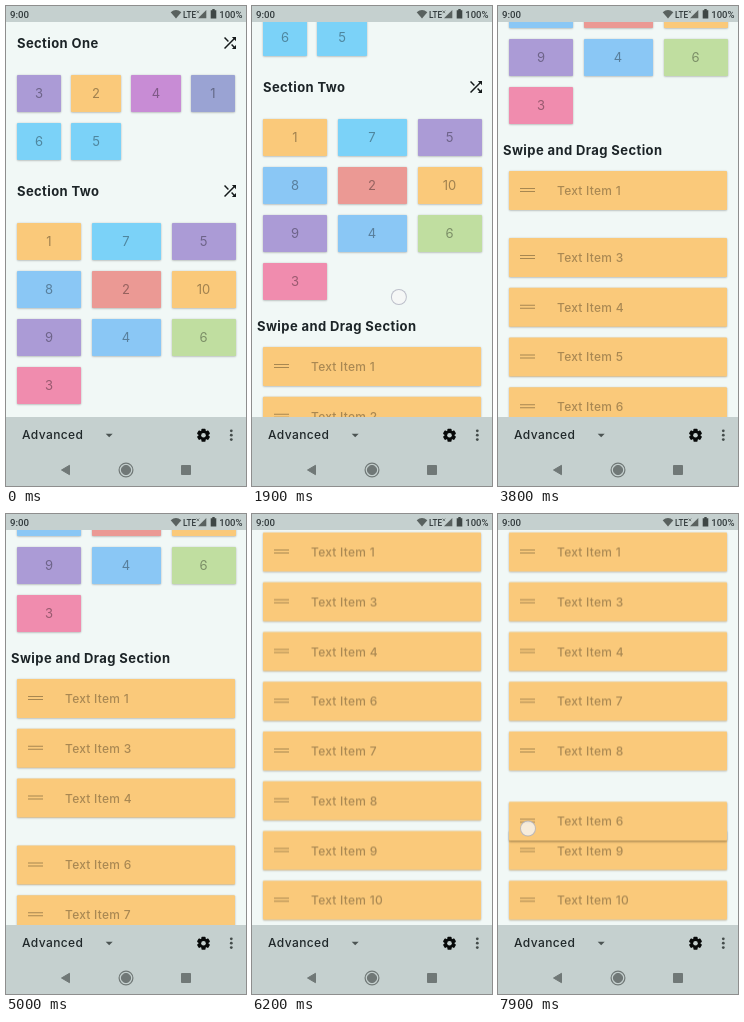
Animation, 240 px wide and 480 px high, one loop 8 s. Source, as an HTML page:

```html
<!DOCTYPE html>
<html lang="en">
<head>
<meta charset="utf-8">
<title>Lists</title>
<style>
  html, body { margin: 0; width: 100%; height: 100%; overflow: hidden; }
  #stage { position: relative; width: 240px; height: 480px; overflow: hidden;
    background: #f1f8f6; font: 500 12px Inter, sans-serif; }
  #page, #page > *, #touch { position: absolute; }
  #page { left: 0; top: 0; width: 240px; height: 900px; will-change: transform; }
  h2 { margin: 0; height: 20px; font: 700 13px/20px Inter, sans-serif;
    letter-spacing: .4px; color: #1c2427; white-space: nowrap; }
  .card { border-radius: 1px; box-shadow: 0 .5px 2px rgba(0, 0, 0, .32); }
  .tile { height: 37px; font: 400 13px/37px Inter, sans-serif;
    text-align: center; color: rgba(0, 0, 0, .36); }
  .row { left: 11px; top: 0; width: 218px; height: 39px; line-height: 39px;
    background: #fac97a; color: rgba(0, 0, 0, .32); letter-spacing: .25px; }
  .row span { position: absolute; left: 48px; white-space: nowrap; }
  .row::before { content: ""; position: absolute; left: 11px; top: 16.6px; width: 15px;
    height: 2px; border: solid rgba(0, 0, 0, .33); border-width: 1.8px 0; }
  #touch { left: -8px; top: -8px; width: 14px; height: 14px; border-radius: 50%;
    border: 1px solid rgba(110, 115, 140, .42); background: rgba(246, 246, 246, .78); }
  #chrome { position: absolute; left: 0; top: 0; }
</style>
</head>
<body>
<div id="stage">
  <div id="page"></div>
  <svg id="chrome" width="240" height="480" viewBox="0 0 240 480">
    <defs>
      <path id="shuffle" d="M10.59 9.17L5.41 4 4 5.41l5.17 5.17zM14.5 4l2.04 2.04L4 18.59 5.41 20 17.96 7.46 20 9.5V4zM14.83 13.41l-1.41 1.41 3.13 3.13L14.5 20H20v-5.5l-2.04 2.04z"/>
      <rect id="tooth" x="-2.1" y="-6.5" width="4.2" height="13" rx=".8"/>
    </defs>
    <path fill="#c5d0cf" d="M0 0H240V16H0zM0 411H240V480H0z"/>
    <g font-family="Roboto, sans-serif" font-size="9.7" fill="#30383a">
      <text x="4" y="12">9:00</text>
      <text x="177" y="11.5" font-size="8.2">LTE</text>
      <text x="236.5" y="12" font-size="9.5" text-anchor="end">100%</text>
    </g>
    <g fill="#59615f">
      <path d="M164.7 6.2Q170 1.6 175.3 6.2L170 12.5z"/>
      <path d="M200.3 4V12.3H192z"/>
      <path d="M190.6 4.6l2.6 2.6m0-2.6l-2.6 2.6" stroke="#59615f" stroke-width=".8"/>
      <path d="M204.7 4.2h1.6V3h2.4v1.2h1.6v8.3h-5.6z" fill="#3f4746"/>
    </g>
    <text x="16" y="433.4" font-family="Inter, sans-serif" font-size="12" font-weight="500" letter-spacing=".4" fill="#20282a">Advanced</text>
    <path d="M99.7 427.7h7l-3.5 3.6z" fill="#4c5453"/>
    <g transform="translate(197.5 429.2)" fill="#080a0a">
      <use href="#tooth"/>
      <use href="#tooth" transform="rotate(60)"/>
      <use href="#tooth" transform="rotate(120)"/>
      <circle r="4.9"/>
      <circle r="2.3" fill="#c5d0cf"/>
    </g>
    <g fill="#444c4b">
      <circle cx="225.3" cy="424.8" r="1.4"/>
      <circle cx="225.3" cy="429.2" r="1.4"/>
      <circle cx="225.3" cy="433.6" r="1.4"/>
    </g>
    <g fill="#707877" stroke="#707877" stroke-linejoin="round">
      <path d="M55.5 464l8-4.7v9.4z"/>
      <circle cx="120" cy="464" r="4.6"/>
      <circle cx="120" cy="464" r="6.9" fill="none" stroke-width="1.2"/>
      <path d="M175.5 459.5h9v9h-9z"/>
    </g>
  </svg>
  <div id="touch"></div>
</div>
<script>
const LOOP = 8000, STEP = 100, PITCH = 49.75, LIST_TOP = 445;
const page = document.getElementById('page');
const touch = document.getElementById('touch');

function add(tag, cls, html, style) {
  const el = document.createElement(tag);
  el.className = cls;
  el.innerHTML = html;
  Object.assign(el.style, style);
  page.append(el);
  return el;
}

function heading(text, x, mid, icon) {
  add('h2', '', text, { left: x + 'px', top: mid - 10 + 'px' });
  if (icon) add('div', '', `<svg width="18" height="18" viewBox="0 0 24 24" style="display:block" fill="#14191a"><use href="#shuffle"/></svg>`,
    { left: '215px', top: mid - 9 + 'px' });
}

const colors = {
  purple: '#ab9bd6', orange: '#fac97a', magenta: '#c88cd5', indigo: '#9aa3d3', cyan: '#7bd2f8',
  blue: '#8ac7f5', red: '#eb9994', green: '#c0dea0', pink: '#f08cae'
};

// Each column is [left, width]; tiles fill the columns row by row.
function grid(top, columns, tiles) {
  tiles.split(' ').forEach((tile, i) => {
    const [label, color] = tile.split(':');
    const [left, width] = columns[i % columns.length];
    add('div', 'card tile', label, {
      left: left + 'px', width: width + 'px', background: colors[color],
      top: top + 48 * Math.floor(i / columns.length) + 'px'
    });
  });
}

heading('Section One', 11, 37, true);
grid(68.5, [[11, 44], [65, 50], [125, 50], [185, 44]],
  '3:purple 2:orange 4:magenta 1:indigo 6:cyan 5:cyan');
heading('Section Two', 11, 185, true);
grid(217, [[11, 64], [85.5, 69], [165.5, 64]],
  '1:orange 7:cyan 5:purple 8:blue 2:red 10:orange 9:purple 4:blue 6:green 3:pink');
heading('Swipe and Drag Section', 5, 424, false);

const rows = Array.from({ length: 10 }, (_, i) =>
  add('div', 'card row', `<span>Text Item ${i + 1}</span>`, {}));
rows[5].style.zIndex = 1;

// Piecewise linear value at time t
function track(points, t) {
  if (t <= points[0][0]) return points[0][1];
  for (let i = 1; i < points.length; i++) {
    const [a, va] = points[i - 1], [b, vb] = points[i];
    if (t < b) return va + (vb - va) * (t - a) / (b - a);
  }
  return points[points.length - 1][1];
}

// Accelerate-decelerate move lasting 250 ms
const settle = (t, start) => {
  const p = Math.min(1, Math.max(0, (t - start) / 250));
  return (1 - Math.cos(Math.PI * p)) / 2;
};

const scrollPath = [[1200, 0], [1400, 5], [1600, 32], [1900, 104], [2200, 208], [2400, 267], [2500, 280],
  [5200, 280], [5300, 296], [5500, 360], [5700, 412], [5900, 424], [6000, 426.5]];
const swipeA = [[3000, 0], [3100, 12], [3300, 95], [3500, 245]];
const swipeB = [[4400, 0], [4500, 70], [4700, 245]];
const dragPath = [[6600, 0], [6800, 4], [7000, 13], [7200, 28], [7300, 39], [7400, 53],
  [7600, 97], [7700, 107], [7900, 120]];

// Finger gestures: from, to, place
const gestures = [
  [1200, 2700, s => [148 - 3 * s.scroll / 280, 395 - s.scroll]],
  [3000, 3500, s => [110 + s.a * .6, 235]],
  [4400, 4700, s => [110 + s.b * .6, 335]],
  [5200, 6200, s => [148, 605 - s.scroll]],
  [6500, LOOP, s => [30, 194.5 + s.drag]]
];

function draw(t) {
  const s = {
    scroll: track(scrollPath, t), a: track(swipeA, t),
    b: track(swipeB, t), drag: track(dragPath, t)
  };
  page.style.transform = `translateY(${-s.scroll}px)`;

  const gapA = settle(t, 3650), gapB = settle(t, 4850);
  rows.forEach((row, i) => {
    let slot = i, x = 0, y = 0;
    if (i > 1) slot -= gapA;
    if (i > 4) slot -= gapB;
    if (i === 1) x = s.a;
    if (i === 4) x = s.b;
    if (i === 5) y = s.drag;
    if (i === 6) slot -= settle(t, 7380);
    if (i === 7) slot -= settle(t, 7620);
    row.style.transform = `translate(${x}px, ${LIST_TOP + slot * PITCH + y}px)`;
  });
  rows[5].style.boxShadow = t >= 6600 ? '0 1px 2px rgba(0,0,0,.42)' : '';

  const g = gestures.find(([from, to]) => t >= from && t < to);
  touch.style.opacity = g ? (t >= 2500 && t < 2700 ? .7 : 1) : 0;
  if (g) {
    const [x, y] = g[2](s);
    touch.style.transform = `translate(${x}px, ${y}px)`;
  }
}

const start = performance.now();
function frame() {
  const t = (performance.now() - start) % LOOP;
  draw(Math.floor(t / STEP) * STEP);
  requestAnimationFrame(frame);
}
draw(0);
requestAnimationFrame(frame);
</script>
</body>
</html>
```
